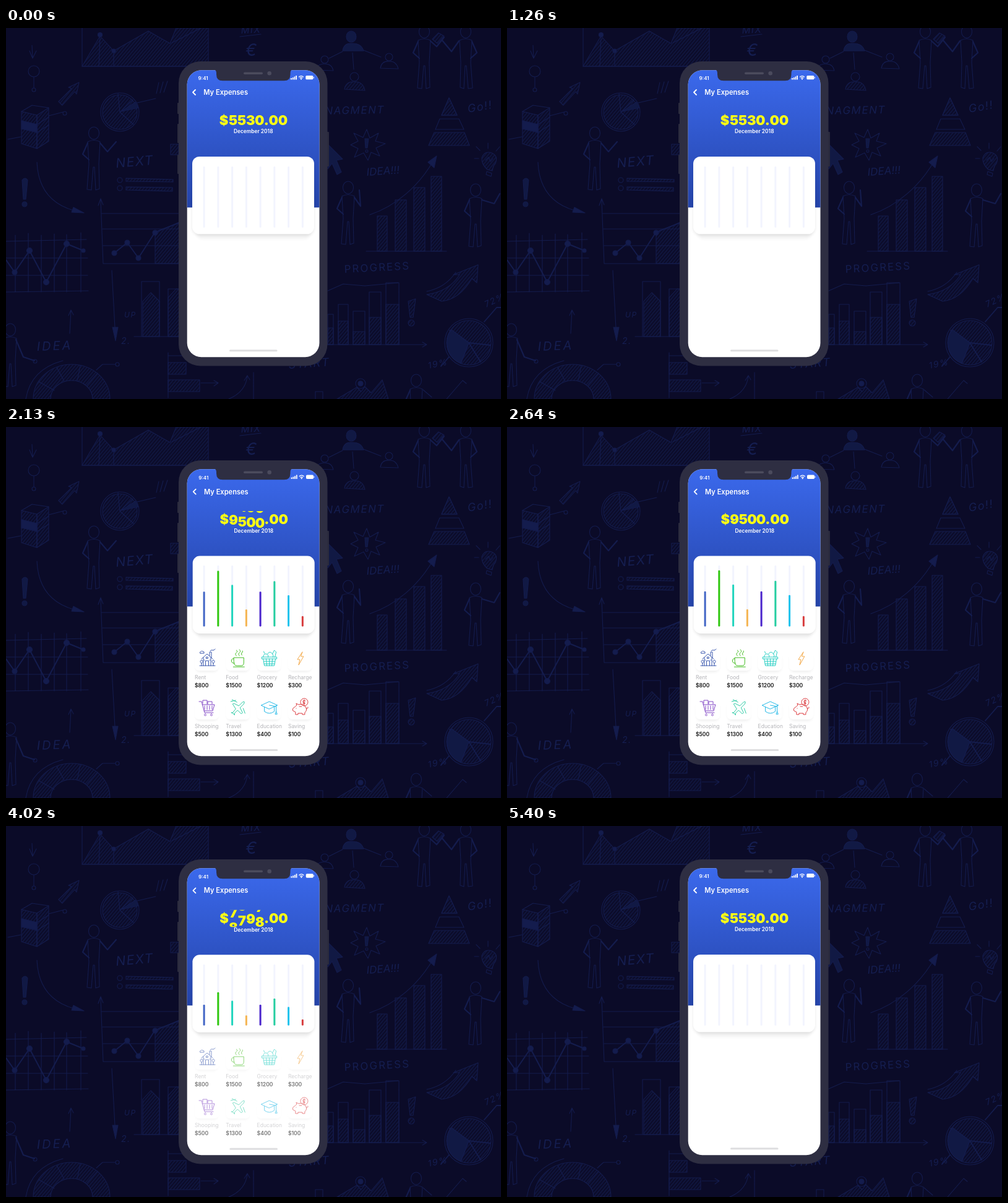
Write an HTML page that moves like this. It is 800 px wide and 600 px high and loops after 5430 ms.

```html
<!DOCTYPE html>
<html lang="en">
<head>
<meta charset="utf-8">
<title>My Expenses</title>
<style>
html, body { margin: 0; width: 100%; height: 100%; overflow: hidden; background: #0b0b28; }
svg { display: block; width: 800px; height: 600px; font-family: Inter, sans-serif; }
#doodles { fill: none; stroke: #141c4d; stroke-width: 1.1; stroke-linecap: round; stroke-linejoin: round; }
#doodles text { fill: #151e50; stroke: none; font-size: 19px; font-style: italic; letter-spacing: 1.5px; }
#doodles .h { fill: url(#hatch); }
#doodles .d { fill: #141c4d; }
#doodles .m { fill: #111944; }
.big { font-size: 21.8px; font-weight: 900; fill: #fcff14; text-anchor: middle; }
.white { fill: #fff; font-weight: 600; }
.label { font-size: 8.6px; fill: #b4b4b8; }
.price { font-size: 8.6px; font-weight: 600; fill: #161616; }
.icon { fill: none; stroke-width: 1; stroke-linecap: round; stroke-linejoin: round; }
</style>
</head>
<body>
<svg viewBox="0 0 800 600">
<defs>
  <pattern id="hatch" width="4" height="4" patternUnits="userSpaceOnUse" patternTransform="rotate(40)">
    <path d="M1 0V4" stroke="#121945" stroke-width="1.4"/>
  </pattern>
  <linearGradient id="blue" x1="0" y1="0" x2="0" y2="1">
    <stop offset="0" stop-color="#3b69ec"/><stop offset="1" stop-color="#2544a9"/>
  </linearGradient>
  <clipPath id="screen"><rect x="292.7" y="68.3" width="213.8" height="464" rx="23"/></clipPath>
  <clipPath id="window"><rect x="340" y="135.5" width="120" height="27.5"/></clipPath>
  <filter id="soft" x="-20%" y="-20%" width="140%" height="150%"><feGaussianBlur stdDeviation="2.5"/></filter>
  <g id="man">
    <ellipse class="m" rx="8.500" ry="10"/>
    <path class="m" d="M-10 14Q0 9 10 14L8 50L9 90L3 92L1 55H-1L-4 92L-11 91L-8 50Z"/>
    <path stroke-width="2.2" d="M-10 16L-18 34L-8 43"/>
  </g>
  <g id="arm"><path stroke-width="2.2" d="M10 16L22 30L36 14"/></g>
</defs>

<g id="doodles">
  <!-- left side -->
  <path class="h" d="M123 62L152 13L174 37L230 5L265 25L275 0H327V62Z"/>
  <path d="M123 0V62H328M150 62L152 13M174 37V62M268 24L327 -6"/>
  <circle class="d" cx="152" cy="11" r="3.5"/><circle class="d" cx="174" cy="37" r="3"/>
  <path d="M42 28L43 49L38 37M43 49L49 37M45 79V97"/>
  <circle cx="45" cy="70" r="9"/><circle cx="45" cy="100" r="3"/>
  <path class="h" d="M85 119L106 98L101 96L118 88L114 107L111 103L91 125Z"/>
  <circle class="h" cx="184" cy="136" r="28"/><circle cx="184" cy="136" r="31"/>
  <path d="M184 136L181 106M184 136L205 116M184 136L206 156"/>
  <path class="m" d="M186 135L209 120L214 129Z"/>
  <path d="M212 121L242 114M243 106L247 88M249 105L254 87M255 104L261 86"/>
  <path class="h" d="M25 135L50 141V195L25 187Z"/><path class="h" d="M50 141L69 129V183L50 195Z"/>
  <path d="M25 135L42 125L69 129M25 150L50 156L69 144M25 163L50 169L69 157M69 142L92 136M3 180L24 176"/>
  <path class="d" d="M25 150L50 156V168L25 163Z"/><circle cx="95" cy="138" r="3"/>
  <use href="#man" x="142" y="170"/><use href="#arm" x="142" y="170"/>
  <text x="178" y="226" transform="rotate(-5 178 226)" style="font-size:21px">NEXT</text>
  <circle cx="184" cy="246" r="4"/><circle cx="184" cy="259" r="4"/>
  <path class="h" d="M194 243L270 245V249L194 248ZM194 257L269 258V264L194 262Z"/>
  <path class="m" d="M26 246Q31 240 35 246L32 277H28Z"/><circle class="m" cx="30" cy="285" r="4"/>
  <path d="M50 217C52 265 78 290 122 298"/><path class="d" d="M126 299L109 290L106 298Z"/>
  <path d="M0 345L130 342M0 372H132M0 400H132M0 427L133 425M15 335V427M36 332V427M57 335V427M78 333V427M98 334V427M121 331V427"/>
  <path stroke-width="2" d="M0 375L14 395L38 360L65 411L98 349L125 360"/>
  <circle class="d" cx="14" cy="395" r="4"/><circle class="d" cx="38" cy="360" r="4.5"/>
  <circle class="d" cx="65" cy="411" r="4.5"/><circle class="d" cx="98" cy="349" r="4.5"/><circle class="d" cx="125" cy="360" r="3"/>
  <path class="h" d="M241 331L280 314V381H241Z"/>
  <path d="M153 278L157 381H280M155 300H280M156 325H280M157 352H280M149 287L153 276L157 286"/>
  <path stroke-width="1.8" d="M175 364L196 347L214 372L241 330L280 315"/>
  <circle class="d" cx="175" cy="364" r="4"/><circle class="d" cx="196" cy="347" r="4"/>
  <circle class="d" cx="214" cy="372" r="4"/><circle class="d" cx="241" cy="331" r="4"/>
  <path d="M171 392L177 503"/><path class="d" d="M177 506L172 484H181Z"/>
  <path d="M219 410H248V499H219ZM262 422H282V499H262ZM207 499H280"/>
  <path class="h" d="M221 499V442L234 428L248 442V499Z"/><path class="h" d="M262 499V436L275 422H282V499Z"/>
  <text x="191" y="468" style="font-size:12px">UP</text><text x="186" y="511" style="font-size:14px">2.</text>
  <path d="M103 494L105 456L101 465M105 456L109 464"/>
  <text x="50" y="522" transform="rotate(-2 50 522)" style="font-size:20px;letter-spacing:3px">IDEA</text>
  <use href="#man" x="7" y="488"/><path stroke-width="2.200" d="M16 504L28 532L46 538"/>
  <circle cx="47" cy="539" r="3"/>
  <path class="h" d="M44 600A62 56 0 0 1 168 600H140A34 30 0 0 0 72 600Z"/>
  <path d="M53 572L78 586M82 549L94 571M120 546L115 571M148 558L131 577M32 600Q40 552 92 538M146 553L156 544H177"/>
  <circle cx="180" cy="544" r="3"/>
  <path d="M262 525V598M262 530H285"/><path class="h" d="M262 541H291V560H262ZM262 569H313V588H262Z"/>
  <path d="M315 574H343L336 570M343 574L336 579M360 600Q388 588 390 562L385 570M390 562L394 569M400 557V600"/>
  <path class="h" d="M266 188H279V205H266Z"/>

  <!-- top and right side -->
  <text x="380" y="9" transform="rotate(-3 380 9)" style="font-size:15px">MIX</text>
  <text x="387" y="45" style="font-size:27px">€</text><path d="M378 14L412 10"/>
  <ellipse class="m" cx="558" cy="14" rx="8" ry="9"/><path class="m" d="M544 37Q546 24 558 25Q574 24 578 37Z"/>
  <path d="M544 38L522 49M560 40L562 67M578 36L606 47"/>
  <circle cx="563" cy="79" r="7"/><path class="h" d="M547 99Q549 86 563 87Q577 86 580 101Z"/>
  <circle cx="619" cy="47" r="6"/><path d="M605 65Q607 53 619 54Q631 53 634 66Z"/>
  <circle cx="515" cy="51" r="6"/><path d="M500 68Q503 58 515 58Q527 58 529 69Z"/>
  <use href="#man" x="676" y="6"/><use href="#man" x="743" y="6" transform="translate(1486) scale(-1 1)"/>
  <path stroke-width="2.2" d="M686 21L696 30L708 15M732 21L720 38L705 20"/>
  <path class="h" d="M689 18L699 8L708 13L697 25Z"/>
  <text x="612" y="138" text-anchor="end" transform="rotate(-1 612 138)" style="font-size:17px">MANAGMENT</text>
  <path d="M716 113L704 141H729ZM701 147L694 164H740L732 147Z"/>
  <path class="h" d="M716 113L704 141H729ZM692 169L683 190H749L741 169Z"/>
  <text x="747" y="137" transform="rotate(-10 747 137)" style="font-size:18px">Go!!</text>
  <path d="M583 164L588 178L602 170L597 183L613 187L598 194L604 207L590 201L585 214L578 202L563 209L569 195L557 189L569 183L562 170L577 177Z"/>
  <path class="m" d="M580 179H586L584 194H581Z"/><circle cx="583" cy="199" r="2"/>
  <path class="m" d="M520 188L544 212L534 214L542 233L535 237L527 219L520 228Z"/>
  <text x="583" y="239" transform="rotate(-4 583 239)" style="font-size:17px;letter-spacing:0">IDEA!!!</text>
  <path class="h" d="M778 229Q768 220 769 210Q773 198 785 202Q796 207 791 219Q787 223 786 231Z"/>
  <path d="M777 232L785 235L784 240L776 237ZM766 198L760 192M779 195V186M792 199L798 192M764 211H757M775 214L780 209L783 216L787 211"/>
  <path class="h" d="M600 304H616V361H600ZM629 278H647V361H629ZM659 258H677V361H659ZM687 240H704V361H687Z"/>
  <path d="M582 361H712M588 302C630 288 668 255 691 214"/><path class="d" d="M696 207L692 226L682 217Z"/>
  <use href="#man" x="553" y="258"/><path stroke-width="2.2" d="M563 274L573 288L571 262"/>
  <use href="#man" x="759" y="262"/><path stroke-width="2.2" d="M769 278L789 284L798 268"/>
  <text x="547" y="396" transform="rotate(-3 547 396)" style="font-size:17px;font-style:normal;letter-spacing:2px">PROGRESS</text>
  <path class="h" d="M680 431Q716 426 733 399L723 399L763 383L761 412L753 405Q733 439 704 442Z"/>
  <path d="M680 426Q710 420 727 395"/>
  <path d="M520 463H529V512H520ZM537 447H553V512H537ZM561 458H580V512H561ZM587 427H606V512H587ZM614 412H635V512H614Z"/>
  <path class="h" d="M520 485H529V512H520ZM537 474H553V512H537ZM561 491H580V512H561ZM587 468H606V512H587ZM614 447H635V512H614Z"/>
  <path d="M519 512H680L673 508M680 512L673 516M520 425L545 414L580 417L634 412"/>
  <path class="h" d="M650 442L662 438L658 468H653Z"/><circle class="h" cx="655" cy="477" r="5"/>
  <text x="776" y="452" transform="rotate(-25 776 452)" style="font-size:14px">72%</text>
  <circle cx="748" cy="509" r="39"/><circle class="h" cx="748" cy="509" r="36"/>
  <path stroke-width="1.8" d="M748 509L717 489M748 509L783 513M748 509L735 542M748 509L767 540M773 475L793 452H800M716 532L703 547"/>
  <path class="m" d="M748 509L720 488A35 35 0 0 0 735 542Z"/>
  <text x="683" y="551" transform="rotate(-12 683 551)" style="font-size:14px">19%</text>
  <text x="457" y="551" transform="rotate(-4 457 551)" style="font-size:18px;letter-spacing:2px">START</text>
  <circle cx="573" cy="575" r="8"/><circle class="d" cx="573" cy="575" r="4"/>
  <path class="h" d="M535 600L567 581L574 588L580 580L590 590L608 569L618 600Z"/>
  <use href="#man" x="663" y="570"/><path d="M674 585L688 597M712 600L738 570L744 575M500 600V588H512V600"/>
</g>

<!-- phone -->
<g fill="#2a2a3d">
  <rect x="277" y="121" width="4" height="18" rx="1"/><rect x="277" y="155" width="4" height="31" rx="1"/>
  <rect x="277" y="205" width="4" height="31" rx="1"/><rect x="518" y="168" width="4" height="56" rx="1"/>
</g>
<rect x="279" y="54" width="240.5" height="492.500" rx="35" fill="#2e2e42"/>
<g clip-path="url(#screen)">
  <rect x="292" y="68" width="215" height="465" fill="#fff"/>
  <rect x="292" y="68" width="215" height="222.3" fill="url(#blue)"/>
</g>
<path d="M336 67Q340 68 340 73V75Q340 85.300 350 85.300H449.500Q459.500 85.300 459.500 75V73Q459.500 68 463.500 67Z" fill="#2e2e42"/>
<rect x="384" y="71.5" width="31" height="3.5" rx="1.7" fill="#4b4b5d"/>
<circle cx="425.7" cy="73.3" r="3.3" fill="#4b4b5d"/>

<g id="content">
  <text class="white" x="310.5" y="84.3" font-size="8">9:41</text>
  <g fill="#fff">
    <path d="M460 81h1.8v2.5h-1.8zM462.8 80h1.8v3.5h-1.8zM465.5 78.6h1.8v4.9h-1.8zM468.2 77h1.8v6.5h-1.8z"/>
    <rect x="484.3" y="77" width="12" height="6.3" rx="1.6"/><rect x="496.8" y="79" width="1" height="2.4" rx=".5"/>
    <circle cx="477" cy="82.6" r="1.1"/>
  </g>
  <path d="M473 79.4Q477 75.8 481 79.4M474.8 81.2Q477 79.2 479.2 81.2" fill="none" stroke="#fff" stroke-width="1.2"/>
  <path d="M306 100L302 104L306 108" fill="none" stroke="#fff" stroke-width="1.8" stroke-linecap="round" stroke-linejoin="round"/>
  <text class="white" x="319.3" y="108" font-size="11.1">My Expenses</text>
  <text class="big" x="352" y="156.7">$</text>
  <g id="reels" clip-path="url(#window)"></g>
  <text class="big" x="420.7" y="156.7">.</text>
  <text class="big" x="432.3" y="156.7">0</text><text class="big" x="447.5" y="156.7">0</text>
  <text class="white" x="399.7" y="170.2" font-size="8.4" text-anchor="middle">December 2018</text>
  <rect x="308" y="300" width="184" height="41" rx="9" opacity=".05" filter="url(#soft)"/>
  <rect x="301" y="212" width="197" height="123" rx="11.500" opacity=".09" filter="url(#soft)"/>
  <rect x="301" y="208" width="197" height="125.3" rx="11.5" fill="#fff"/>
  <rect x="361" y="520.3" width="77.5" height="3" rx="1.5" fill="#dedee0"/>
</g>
<g id="chart"></g>
<g id="items"></g>
</svg>

<script>
const LOOP = 5430, SPAN = 800, OPEN = 1376, CLOSE = 3668;
const ROW = 24, BASE = 156.7, FLOOR = 322.7;

// name, amount, colour, bar height, bar colour, icon outline around its centre
const items = [
  ['Rent', 800, '#3b58ae', 57, '#4265c5',
    'M-9 1L0 -7L9 1M-6 -1V12M6 -1V12M-2.5 12V4H2.5V12M-12 12H13M4 -4V-10H7V-1M5 -12q2 -2 4 -1t4 -2M-4 3h-1M5 3h-1M-9 12V8M10 12V8M-9 8a2 2.5 0 1 1 .1 0M10 8a2 2.5 0 1 1 .1 0M-11 -8h6q1 -3 -2 -3q-2 -2 -3 .5q-3 0 -1 2.5M-1.2 -2h2.4v2.4h-2.4z'],
  ['Food', 1500, '#43bd20', 91, '#30c80f',
    'M-7 -1H9V7Q9 12 5 12H-2Q-7 12 -7 7ZM-7 1Q-11 0 -11 4Q-11 8 -6 8M-8 14H10M-3 -4q-3 -3 0 -5t0 -4M2 -4q-3 -3 0 -5t0 -5M6 -5q-2 -2 0 -4t1 -3'],
  ['Grocery', 1200, '#28cfc4', 68, '#20d5bd',
    'M-12 -2H12V1H-12ZM-10 1L-8 12H8L10 1M-9 5H9M-8.5 9H8.5M-5 1L-4 12M0 1V12M5 1L4 12M-10 -2Q-9 -8 -5 -7Q-1 -6 -2 -2M-3 -7Q1 -13 5 -7Q7 -5 6 -2M5 -7L8 -13L11 -10L9 -2M-8 -8l-1 -3'],
  ['Recharge', 300, '#f3aa4b', 28, '#f5b552',
    'M3 -10L-5 2H-1L-3 11L5 -3H1Z'],
  ['Shooping', 500, '#8146c5', 57, '#4b25cb',
    'M-13 -9H-9L-4 9H10M-8 -4H12L9 6H-5M-4 -2V4M0 -2V4M4 -2V4M8 -2V4M-7 -6V-11H0V-5M1 -5V-9H8V-5M-3 11a1.5 1.5 0 1 1 -.1 0M7 11a1.5 1.5 0 1 1 -.1 0'],
  ['Travel', 1300, '#30cca6', 74, '#25cea0',
    'M-9 9L-4 3L-9 -5L-7 -6L1 -2L7 -8Q10 -10 10 -8L9 -5L3 1L7 9L5 11L-1 5L-6 10L-6 13L-8 10L-11 9ZM-12 -9L-4 -11M-10 -12L-2 -8M8 2L11 10'],
  ['Education', 400, '#25b9e7', 51, '#1dc3ed',
    'M-13 -3L0 -9L13 -3L0 3ZM-8 0V7Q0 13 8 7V0M11 -2V7M0 -3L11 -1M9.5 11L11 7L12.5 11Z'],
  ['Saving', 100, '#dc3c40', 17, '#d83d3d',
    'M-12 2Q-8 -1 -6 -3L-7 -6L-3 -4Q4 -6 8 -1Q12 4 7 9V12H3V10H-4V12H-8V8L-12 6ZM-7 2h.2M-2 -1h4M9 2q4 1 3 -2M6 -2a6 6 0 1 1 .1 0M8 -10Q4 -12 4 -9T7 -7Q8 -4 4 -6M6 -12V-4']
];

// reel centre, starting position, travel
const reels = [[367, 5, 4], [381, 5, 20], [395.2, 3, 27], [409.7, 0, 30]];

function add(parent, tag, attrs, text = '') {
  const el = document.createElementNS('http://www.w3.org/2000/svg', tag);
  for (const k in attrs) el.setAttribute(k, attrs[k]);
  el.textContent = text;
  return parent.appendChild(el);
}
const byId = id => document.getElementById(id);
const content = byId('content'), list = byId('items'), chart = byId('chart');

const digits = reels.map(([x]) =>
  [0, 1].map(() => add(byId('reels'), 'text', { class: 'big', x })));

const bars = items.map(([name, cost, color, height, barColor, outline], i) => {
  const x = 318.6 + i * 22.75;
  add(chart, 'rect', { x, y: 224, width: 3, height: 98.7, rx: 1, fill: '#f2f4fe' });
  const bar = add(chart, 'rect', { x, width: 3, rx: 1.4, fill: barColor });

  const left = 305 + (i % 4) * 50.3, top = i < 4 ? 0 : 79;
  add(list, 'rect', { x: left + 2, y: 368 + top, width: 35, height: 28, rx: 6, opacity: .07, filter: 'url(#soft)' });
  add(list, 'rect', { x: left, y: 355 + top, width: 39, height: 39, rx: 7, fill: '#fff' });
  add(list, 'path', { class: 'icon', d: outline, stroke: color,
    transform: `translate(${left + 20} ${374 + top})` });
  add(list, 'text', { class: 'label', x: left, y: 407.7 + top }, name);
  add(list, 'text', { class: 'price', x: left, y: 420.5 + top }, '$' + cost);
  return [bar, height];
});

function ease(t) {
  const k = Math.min(1, Math.max(0, t / SPAN));
  return (1 - Math.cos(Math.PI * k)) / 2;
}

function draw(time) {
  const t = time % LOOP;
  const p = ease(t - OPEN) - ease(t - CLOSE);

  reels.forEach(([, from, travel], i) => {
    const pos = from + travel * p, n = Math.floor(pos + 1e-6);
    digits[i].forEach((el, k) => {
      el.textContent = (n + k) % 10;
      el.setAttribute('y', BASE + (n + k - pos) * ROW);
    });
  });
  for (const [bar, height] of bars) {
    bar.setAttribute('y', FLOOR - height * p);
    bar.setAttribute('height', height * p);
  }
  list.setAttribute('opacity', p);
  content.setAttribute('transform', `translate(${.7 * p} ${.6 * p})`);
}

const start = performance.now();
function tick() {
  draw(performance.now() - start);
  requestAnimationFrame(tick);
}
tick();
</script>
</body>
</html>
```
